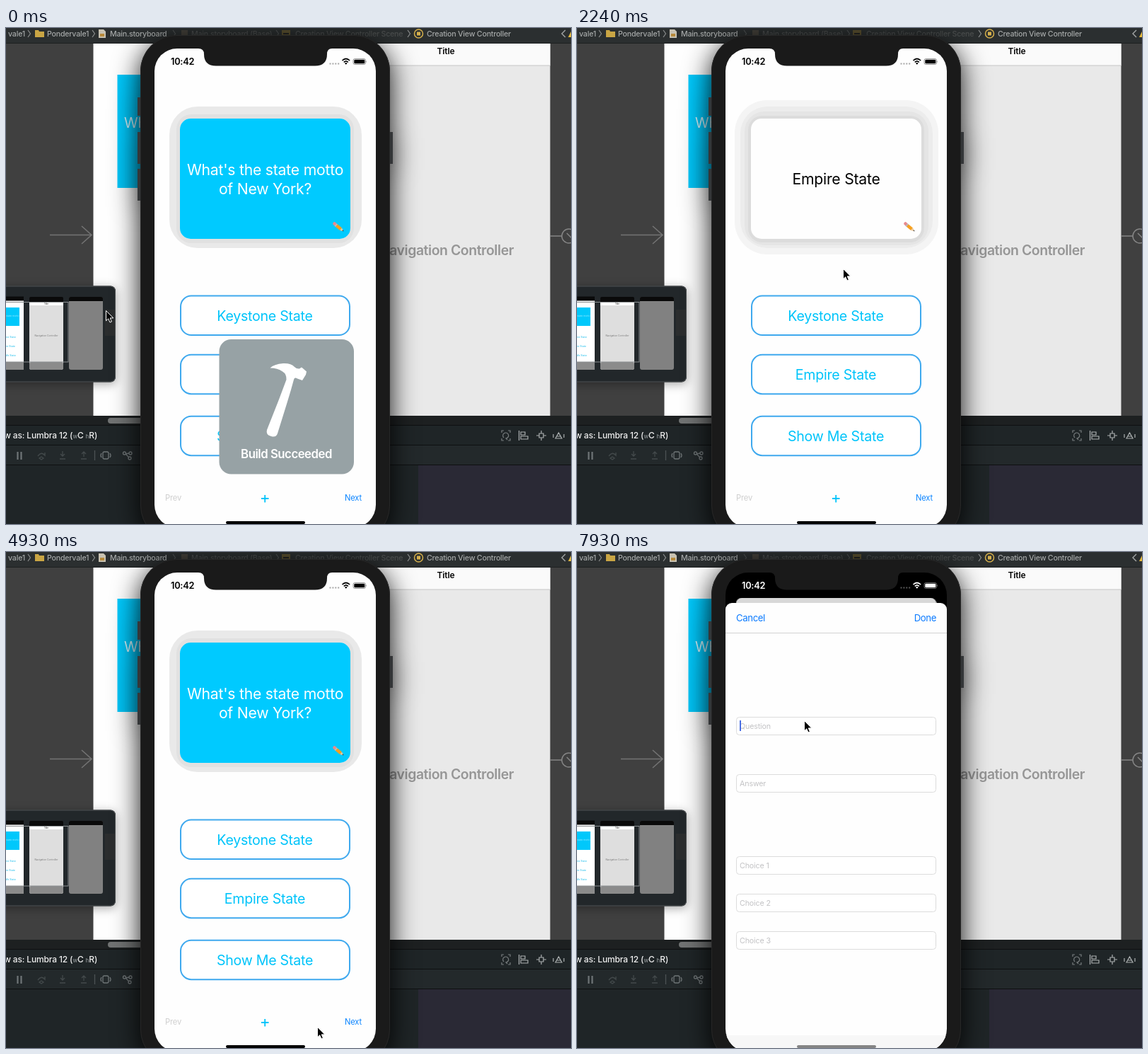
An HTML page for the animation above (8000 ms loop, 799 by 701 pixels).

```html
<!DOCTYPE html>
<html lang="en">
<head>
<meta charset="utf-8">
<title>Flashcard demo</title>
<style>
html, body { margin: 0; width: 100%; height: 100%; overflow: hidden; background: #404040; }
svg { display: block; width: 100vw; height: 100vh; font-family: Inter, "Open Sans", sans-serif; }
.mid { text-anchor: middle; }
.end { text-anchor: end; }
.crumb { font-size: 10.7px; font-weight: 500; letter-spacing: -.25px; fill: #a4a7a7; }
.dim { fill: #4b4e4e; }
.card { font-size: 21.2px; letter-spacing: -.23px; }
.choice { font-size: 19.6px; letter-spacing: -.25px; fill: #00c4fa; }
.box { fill: #fff; stroke: #3fa9ee; stroke-width: 2; }
.bar { font-size: 11.2px; letter-spacing: -.15px; }
.nav { font-size: 13.2px; letter-spacing: -.4px; fill: #0a7aff; }
.field rect { fill: #fff; stroke: #dcdcdc; }
.field text { font-size: 10.7px; letter-spacing: -.15px; fill: #c3c3c5; }
.line { fill: none; stroke: currentColor; }
.body { filter: drop-shadow(0 9px 19px rgba(0, 0, 0, .95)); }
.lift { filter: drop-shadow(0 3px 7px rgba(0, 0, 0, .35)); }

.cursor, .build, .front, .wide, .tight, .tap, .next, .plus, .home, .shade, .sheet, .tools, .status, .grip, .caret {
  animation: 8s step-end infinite;
}
.cursor { animation-name: cursor; }
.build { animation-name: build; }
.front { animation-name: front; }
.tight { animation-name: tight; }
.wide { animation-name: wide; opacity: 0; }
.tap { animation-name: tap; }
.next { animation-name: next; }
.plus { animation-name: plus; }
.home { animation-name: home; }
.shade { animation-name: shade; opacity: 0; }
.sheet { animation-name: sheet; }
.tools { animation-name: tools; }
.status { animation-name: status; color: #000; }
.grip { animation-name: grip; fill: #000; }
.caret { animation-name: caret; opacity: 0; }

@keyframes cursor {
  0% { transform: translate(141px, 399px); }
  1.86% { transform: translate(160px, 430px); }
  3.74% { transform: translate(205px, 500px); }
  5.61% { transform: translate(240px, 550px); }
  7.48% { transform: translate(248px, 562px); }
  11.11% { transform: translate(491px, 179px); }
  12.98% { transform: translate(372px, 484px); }
  22.36% { transform: translate(372px, 476px); }
  26.11% { transform: translate(374px, 440px); }
  27.98% { transform: translate(376px, 340px); }
  29.86% { transform: translate(376px, 282px); }
  42.98% { transform: translate(500px, 636px); }
  46.74% { transform: translate(495px, 645px); }
  48.48% { transform: translate(490px, 655px); }
  50.36% { transform: translate(487px, 661px); }
  59.73% { transform: translate(478px, 666px); }
  61.61% { transform: translate(440px, 671px); }
  63.48% { transform: translate(400px, 670px); }
  65.36% { transform: translate(374px, 666px); }
  67.24% { transform: translate(367px, 664px); }
  82.24% { transform: translate(365px, 640px); }
  84.11% { transform: translate(348px, 500px); }
  85.98% { transform: translate(329px, 363px); }
  89.73% { transform: translate(321px, 258px); }
  91.61% { transform: translate(321px, 238px); }
}
@keyframes build {
  0% { opacity: 1; }
  1.86% { opacity: .85; }
  3.74% { opacity: .5; }
  5.61% { opacity: .2; }
  7.48% { opacity: 0; }
}
@keyframes front { 0%, 37.36% { opacity: 1; } 22.36% { opacity: 0; } }
@keyframes tight { 0%, 59.73% { opacity: 1; } 22.36% { opacity: 0; } }
@keyframes wide { 0%, 59.73% { opacity: 0; } 22.36% { opacity: 1; } }
@keyframes tap { 0%, 24.24% { opacity: 1; } 20.48% { opacity: .3; } 22.36% { opacity: .5; } }
@keyframes next { 0%, 52.24% { opacity: 1; } 48.48% { opacity: .3; } 50.36% { opacity: .6; } }
@keyframes plus { 0%, 78.48% { opacity: 1; } 76.61% { opacity: .75; } }
@keyframes home {
  0% { transform: none; }
  78.48% { transform: translate(366.5px, 46px) scale(.955) translate(-366.5px, -29px); }
  80.36% { transform: translate(366.5px, 62px) scale(.914) translate(-366.5px, -29px); }
  82.24% { transform: translate(366.5px, 65px) scale(.907) translate(-366.5px, -29px); }
}
@keyframes shade {
  0% { opacity: 0; }
  78.48% { opacity: .06; }
  80.36% { opacity: .12; }
  82.24% { opacity: .15; }
}
@keyframes sheet {
  0% { transform: translateY(660px); }
  78.48% { transform: translateY(360px); }
  80.36% { transform: translateY(53px); }
  82.24% { transform: translateY(12px); }
  84.11% { transform: translateY(2px); }
  85.98% { transform: none; }
}
@keyframes tools {
  0% { transform: translateY(-79px); }
  82.24% { transform: translateY(-18px); }
  84.11% { transform: translateY(-3px); }
  85.98% { transform: none; }
}
@keyframes status {
  0% { color: #000; }
  78.48% { color: #666; }
  80.36% { color: #b8b8b8; }
  82.24% { color: #fff; }
}
@keyframes grip { 0% { fill: #000; } 78.48% { fill: #858585; } }
@keyframes caret { 0% { opacity: 0; } 99.11% { opacity: 1; } }
</style>
</head>
<body>
<svg viewBox="0 0 799 701">
  <defs>
    <clipPath id="screen"><rect x="210" y="29" width="313" height="677" rx="32"/></clipPath>
    <clipPath id="panel"><rect x="0" y="364" width="155" height="137"/></clipPath>
    <path id="sep" d="M0 3l3.5 5L0 13" fill="none" stroke="#8b8e8e" stroke-width="1.2"/>
  </defs>

  <!-- editor canvas -->
  <rect width="799" height="701" fill="#404040"/>
  <rect x="123.500" y="22" width="200" height="526" fill="#fefefe"/>
  <rect x="157.500" y="66" width="160" height="160" fill="#00c8fb"/>
  <text x="167" y="140.500" font-size="20" letter-spacing="-.2" fill="#d8f5fd">What's</text>
  <g class="line" color="#737373" stroke-width="1.6"><path d="M62 292.500H120M107 280l14 12.500l-14 12.500"/></g>
  <rect x="500" y="22" width="269.500" height="526" fill="#e9e9e9"/>
  <rect x="500" y="22" width="269.500" height="31" fill="#fafafa"/>
  <path d="M500 53H769.500" stroke="#c5c5c5"/>
  <text class="mid" x="622" y="37" font-size="12" font-weight="600" letter-spacing="-.1">Title</text>
  <text class="end" x="718" y="320.500" font-size="19.400" font-weight="600" letter-spacing="-.42" fill="#969696">Navigation Controller</text>
  <g class="line" color="#858585" stroke-width="1.500"><path d="M770 294H786M793 290l7 7"/><circle cx="796" cy="294" r="10"/></g>

  <!-- path bar -->
  <rect width="799" height="22" fill="#2b2f30"/>
  <path d="M0 21.500H799" stroke="#1c1f20"/>
  <g class="crumb">
    <text class="end" x="27" y="12">vale1</text>
    <text x="58" y="12">Pondervale1</text>
    <text x="147" y="12">Main.storyboard</text>
    <text class="dim" x="262" y="12">Main.storyboard (Base)</text>
    <text class="dim" x="409" y="12">Creation View Controller Scene</text>
    <text x="595" y="12">Creation View Controller</text>
  </g>
  <use href="#sep" x="31"/><use href="#sep" x="122"/><use href="#sep" x="568"/>
  <g opacity=".35"><use href="#sep" x="236"/><use href="#sep" x="382"/></g>
  <path d="M41 3h5l1 2h7v8H41z" fill="#c9a544"/>
  <path d="M131 2h7l3 3v9h-10z" fill="#c8c2b2"/><path d="M133 8h6v4h-6z" fill="#b78a3a"/>
  <path d="M248 3h9v10h-9z" fill="#44413a"/>
  <path d="M390 3h12v10h-12z" fill="#5b512f"/><path d="M392 7h8v2h-8z" fill="#222"/>
  <circle cx="583.500" cy="8" r="6" fill="none" stroke="#d6b04c" stroke-width="1.500"/><path d="M581 5.500h5v5h-5z" fill="#d6b04c"/>
  <path d="M791 3l-5 5l5 5" fill="none" stroke="#a4a7a7" stroke-width="1.400"/>
  <path d="M795 13l5-10v10z" fill="#e4b93c"/>

  <!-- overview panel -->
  <rect class="lift" x="-20" y="364.500" width="175" height="136" rx="7" fill="#22272a"/>
  <g clip-path="url(#panel)">
    <rect x="-10" y="365" width="164.500" height="135" rx="7" fill="#22272a" stroke="#505456"/>
    <rect x="140" y="398" width="14" height="37" fill="#2b2d2e"/>
    <rect x="-24" y="380" width="49" height="103" rx="3" fill="#fff"/>
    <path d="M0 379.500h25v6H0zM33 387v-5q0-2 2-2h44q2 0 2 2v5z" fill="#0a0a0a"/>
    <rect y="395" width="19" height="26" fill="#00c8fb"/>
    <g font-size="3.500" fill="#21bdeb"><text x="0" y="408" fill="#9be9ff">state motto</text><text x="-2" y="438">one State</text><text x="0" y="451">re State</text><text x="-1" y="464">Me State</text></g>
    <rect y="472" width="25" height="11" fill="#8b8b8b"/>
    <path d="M33 387h48v93q0 3-3 3H36q-3 0-3-3z" fill="#dedede"/>
    <rect x="33" y="387" width="48" height="5" fill="#fff"/>
    <text class="mid" x="57" y="391" font-size="3">Title</text>
    <text class="mid" x="57" y="436" font-size="3.300" fill="#777">Navigation Controller</text>
    <rect x="33" y="472" width="48" height="11" rx="3" fill="#8b8b8b"/>
    <rect x="89" y="380" width="48" height="103" rx="3" fill="#818181"/>
    <path d="M89 386v-4q0-2 2-2h44q2 0 2 2v4z" fill="#0a0a0a"/>
    <rect x="-5" y="387.500" width="93" height="84.500" fill="none" stroke="#8b8f91"/>
  </g>

  <!-- lower bars -->
  <rect y="548" width="799" height="13" fill="#1d2021"/>
  <rect x="144" y="551" width="150" height="8" rx="4" fill="#717373"/>
  <rect y="561" width="799" height="28" fill="#1f2527"/>
  <rect y="589" width="799" height="29" fill="#23292b"/>
  <path d="M0 561.500H799M0 589.500H799M0 617.500H799" stroke="#0e1011"/>
  <text x="-3" y="580" font-size="12" font-weight="500" letter-spacing="-.15" fill="#efefef">w as: Lumbra 12 (<tspan font-size="8" fill="#8b9092">w</tspan>C <tspan font-size="8" fill="#8b9092">h</tspan>R)</text>
  <rect y="618" width="583" height="83" fill="#1f2527"/>
  <rect x="583" y="618" width="216" height="83" fill="#2a2935"/>
  <g class="line" color="#6f7577" stroke-width="1.300">
    <path d="M16.500 599v11M21.500 599v11" stroke-width="2.200"/>
    <path d="M125.500 597v14" color="#4d5355"/>
    <rect x="137" y="599" width="8" height="10" rx="2"/><path d="M135 601q-2 3 0 6M147 601q2 3 0 6"/>
    <path d="M169 602l5-1M169 602l5 5"/><circle cx="167.500" cy="601" r="2"/><circle cx="176" cy="601" r="2"/><circle cx="175" cy="608" r="2"/>
  </g>
  <g class="line" color="#43494b" stroke-width="1.300">
    <path d="M45 605q5-7 10-1v-4M47 608l3-2l3 2l-3 2zM80 598v7M77 602l3 3l3-3M76 609h8M110 606v-7M107 602l3-3l3 3M106 609h8"/>
  </g>
  <g class="line" color="#adb1b2" stroke-width="1.200">
    <path d="M701 572v-3h3M710 569h3v3M713 580v3h-3M704 583h-3v-3" color="#777c7e"/>
    <path d="M704 579a4 4 0 1 1 3 1l2 2" color="#777c7e"/>
    <path d="M725.500 569v14M728 571h6v4h-6zM728 577h10v4h-10z"/>
    <path d="M754 573h6v6h-6zM757 569v4M757 579v4M750 576h4M760 576h4"/>
    <path d="M777 580l4.500-8l4.500 8zM774 574v5M789 574v5M779 577h5"/>
  </g>

  <!-- phone -->
  <g class="body">
    <path d="M186 98h6v26h-6zM186 147h6v45h-6zM186 199h6v45h-6zM541 147h6v45h-6z" fill="#343638"/>
    <rect x="190" y="10" width="353" height="716" rx="51" fill="#1a1a1a"/>
  </g>
  <rect x="190.500" y="10.500" width="352" height="715" rx="50.500" fill="none" stroke="#272727"/>
  <rect x="210" y="29" width="313" height="677" rx="32" fill="#000"/>

  <g clip-path="url(#screen)">
    <g class="home">
      <rect x="210" y="29" width="313" height="677" rx="9" fill="#fefefe"/>
      <g class="tight">
        <rect x="231" y="111" width="272" height="200" rx="40" fill="#e9e9e9"/>
        <rect x="241" y="122" width="251" height="182" rx="21" fill="#e1e1e1"/>
      </g>
      <g class="wide">
        <rect x="223" y="102" width="288" height="218" rx="46" fill="#f4f4f4"/>
        <rect x="231" y="111" width="272" height="200" rx="38" fill="#ececec"/>
        <rect x="237" y="118" width="260" height="189" rx="28" fill="#e5e5e5"/>
        <rect x="242" y="124" width="249" height="179" rx="20" fill="#dcdcdc"/>
      </g>
      <rect x="246" y="128" width="241" height="170" rx="15" fill="#fefefe"/>
      <text class="card mid" x="366.500" y="221">Empire State</text>
      <g class="front">
        <rect x="246" y="128" width="241" height="170" rx="15" fill="#00caff"/>
        <g class="card mid" fill="#fff">
          <text x="366.500" y="208">What's the state motto</text>
          <text x="366.500" y="235">of New York?</text>
        </g>
      </g>
      <g stroke-width="4.500">
        <path d="M464.500 276.500l2 2" stroke="#e88a8d" stroke-linecap="round"/>
        <path d="M466 278l1.500 1.300" stroke="#b8bcc0"/>
        <path d="M467.500 279.200l6 5" stroke="#f6a01f"/>
        <path d="M472.200 286l2.800-3.500l2.300 4.700z" fill="#e9c79a" stroke="none"/>
        <path d="M475.500 286.800l1.200-1.500l.8 2.200z" fill="#333" stroke="none"/>
      </g>

      <rect class="box" x="247" y="378.600" width="239" height="55.400" rx="15"/>
      <rect class="box" x="247" y="461.800" width="239" height="55.400" rx="15"/>
      <rect class="box" x="247" y="548.800" width="239" height="55.400" rx="15"/>
      <g class="choice mid">
        <text x="366" y="414">Keystone State</text>
        <text class="tap" x="366" y="497">Empire State</text>
        <text x="366" y="584">Show Me State</text>
      </g>
      <text class="bar" x="225" y="668" fill="#cfcfcf">Prev</text>
      <path class="plus" d="M361 665h10.500M366.200 660v10.500" stroke="#00c4fa" stroke-width="1.800"/>
      <text class="bar next end" x="503" y="668" fill="#0a84ff">Next</text>
      <rect class="shade" x="210" y="29" width="313" height="677" rx="9"/>
    </g>

    <g class="sheet">
      <rect x="210" y="72" width="313" height="720" rx="9" fill="#fefefe"/>
      <path d="M210 114.500H523" stroke="#d2d2d2"/>
      <text class="nav" x="225" y="98">Cancel</text>
      <text class="nav end" x="508" y="98">Done</text>
      <g class="field">
        <rect x="225.500" y="233.500" width="282" height="25" rx="4"/><text x="230" y="250">Question</text>
        <rect x="225.500" y="314.500" width="282" height="25" rx="4"/><text x="230" y="331">Answer</text>
        <rect x="225.500" y="430.500" width="282" height="25" rx="4"/><text x="230" y="447">Choice 1</text>
        <rect x="225.500" y="483.500" width="282" height="25" rx="4"/><text x="230" y="500">Choice 2</text>
        <rect x="225.500" y="536.500" width="282" height="25" rx="4"/><text x="230" y="553">Choice 3</text>
      </g>
      <rect class="caret" x="230" y="238" width="2" height="15" fill="#4a6fe3"/>
      <rect class="tools" x="210" y="683" width="313" height="200" fill="#f7f7f7"/>
    </g>
    <rect class="grip" x="311" y="697" width="112" height="4" rx="2"/>
  </g>

  <path d="M272 28h189v1q-7 0-7 8q0 16.500-17 16.500H297q-17 0-17-16.500q0-8-8-8z" fill="#1a1a1a"/>
  <g class="status" fill="currentColor">
    <text x="233" y="52" font-size="12.800" font-weight="600" letter-spacing="-.25">10:42</text>
    <path class="line" d="M457.500 50.500h14" stroke-width="2" stroke-dasharray="2 1.900" opacity=".35"/>
    <path class="line" d="M475.500 46q5.300-5 10.600 0M477.800 48.300q3-2.700 6 0" stroke-width="1.700"/>
    <path d="M478.900 49.700q1.900-1.300 3.800 0l-1.900 2z"/>
    <rect class="line" x="491" y="43.500" width="17.500" height="8" rx="2.300" stroke-width=".8" opacity=".5"/>
    <rect x="492.300" y="44.800" width="15" height="5.500" rx="1.200"/>
    <path d="M509.300 46q1.200 1.500 0 3z" opacity=".6"/>
  </g>

  <g class="build">
    <rect x="301.500" y="440" width="190.500" height="190.500" rx="17" fill="#97a2a5"/>
    <path d="M373.500 480.500Q379 475 392 474Q403 473.500 408 479Q411 482 415 481.500L418 479.500L425 485.500L424 490L419 498L412 495.500Q408 493 407 497Q403 512 398 528L384 573Q382 579 375 577Q367 575 369 568L386 525L396.500 497Q397 489 391 485.500Q384 480.500 373.500 480.500Z" fill="#fff"/>
    <text class="mid" x="396.500" y="607.500" font-size="16.800" font-weight="600" letter-spacing="-.5" fill="#fff">Build Succeeded</text>
  </g>

  <path class="cursor" d="M.5 .5V14.800L3.700 11.800L6 17L8.400 16L6.200 10.900H10.800Z" fill="#000" stroke="#fff" stroke-width="1"/>
</svg>
</body>
</html>
```
